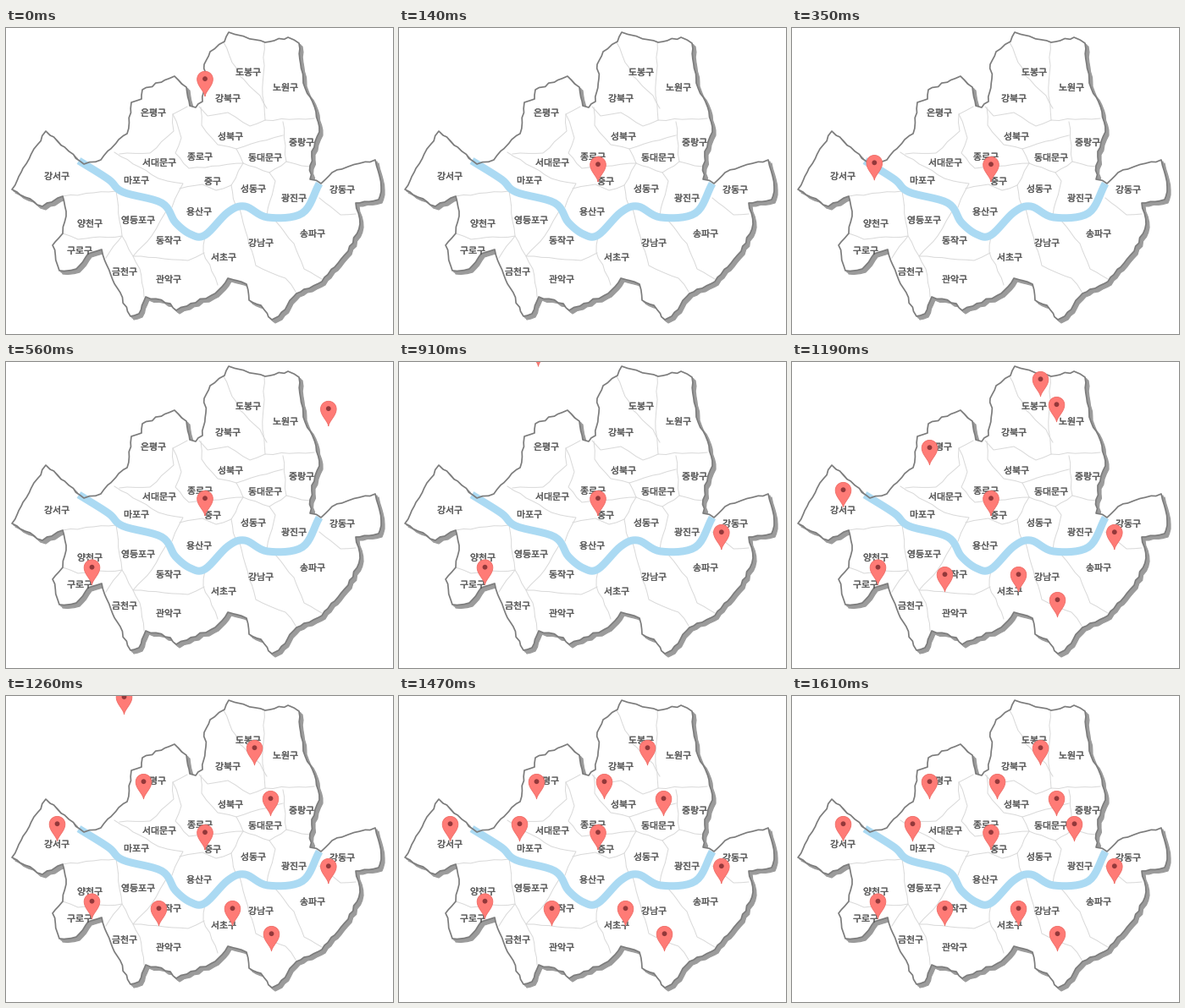
A matplotlib script that plays this animation: 457x362 px, repeating every 8000 ms.

```python
import numpy as np
import matplotlib.pyplot as plt
from matplotlib.animation import FuncAnimation
from matplotlib.patches import Circle, Polygon
from matplotlib.patheffects import withStroke

W, H, DPI = 457, 362, 100
LOOP, INTERVAL, STEP = 8000, 20, 70
PT = 72 / DPI

INK, SHADOW, BORDER = "#7c7c7c", "#9b9b9b", "#d9d9d9"
RIVER, LABEL = "#abdaf3", "#5c5c5c"
PIN, PIN_EDGE, PIN_DOT = "#ff7b76", "#f06f69", "#93383a"

# Turning points of the city limits, clockwise from the west
NORTH = [
    (7, 191), (20, 166), (33, 143), (47, 122), (92, 161), (112, 156),
    (133, 132), (143, 125), (148, 88), (160, 84), (161, 73), (199, 57),
    (213, 70), (217, 92), (224, 94), (232, 87), (236, 60), (234, 43),
    (241, 28), (258, 16), (263, 5), (306, 17), (333, 11), (346, 18),
    (351, 65), (366, 99), (370, 123), (361, 146), (359, 179), (372, 184),
]
SOUTH = [
    (385, 171), (404, 164), (436, 156), (443, 188), (440, 203), (413, 207),
    (418, 232), (404, 264), (373, 300), (343, 314), (322, 341), (314, 345),
    (301, 328), (287, 322), (284, 303), (262, 296), (247, 314), (201, 334),
    (194, 326), (165, 318), (157, 338), (147, 341), (126, 298), (113, 262),
    (97, 267), (83, 285), (63, 287), (55, 257), (67, 243), (71, 217),
    (67, 199), (43, 211),
]

RIVER_PATH = [
    (86, 157), (121, 179), (138, 194), (184, 207), (200, 230), (218, 244),
    (235, 245), (262, 218), (282, 211), (309, 224), (350, 219), (370, 184),
]

# District borders as chains between their main junctions
NORTH_CHAINS = [
    [(257, 17), (274, 55), (300, 80), (308, 95)],
    [(305, 17), (303, 80), (306, 109), (364, 107)],
    [(228, 93), (238, 104), (262, 100), (288, 116), (306, 109)],
    [(214, 93), (197, 102), (198, 122), (170, 148), (134, 149)],
    [(197, 102), (207, 130), (200, 148), (216, 166), (280, 160)],
    [(230, 94), (231, 115), (250, 138), (272, 143), (327, 127)],
    [(327, 111), (331, 158), (359, 164)],
    [(272, 143), (280, 160), (311, 171), (331, 158)],
    [(280, 160), (266, 186), (271, 209)],
    [(311, 171), (318, 181), (308, 222)],
    [(128, 147), (180, 178), (209, 184), (196, 212)],
    [(205, 190), (232, 185), (248, 192), (266, 186)],
]
SOUTH_CHAINS = [
    [(67, 199), (130, 193), (137, 246), (118, 272)],
    [(67, 243), (85, 250), (137, 246), (158, 285), (163, 318)],
    [(192, 211), (172, 246), (150, 270), (215, 275), (234, 266)],
    [(235, 247), (233, 265), (250, 304)],
    [(276, 214), (295, 281), (330, 296), (342, 312)],
    [(318, 228), (340, 255), (352, 285), (373, 297)],
    [(370, 201), (395, 221), (413, 220)],
]

LABELS = [
    ("도봉구", 286, 52), ("노원구", 330, 70), ("강북구", 262, 83),
    ("은평구", 174, 100), ("성북구", 265, 128), ("중랑구", 349, 135),
    ("종로구", 229, 152), ("동대문구", 306, 153), ("서대문구", 181, 159),
    ("마포구", 154, 180), ("중구", 244, 181), ("성동구", 292, 190),
    ("광진구", 340, 201), ("강동구", 397, 191), ("강서구", 60, 175),
    ("양천구", 99, 231), ("영등포구", 156, 227), ("용산구", 228, 217),
    ("동작구", 192, 251), ("송파구", 362, 243), ("강남구", 301, 254),
    ("서초구", 257, 271), ("구로구", 87, 263), ("금천구", 140, 288),
    ("관악구", 192, 297),
]

# Resting tip x, y, landing step, then optionally the steps it takes
# to fall from the top edge and its sideways drift per step
DROPS = [
    (235, 182, 2, 3.6), (101.5, 263.5, 6, 3.16, 4.2), (380.8, 222, 10, 3.04),
    (162.5, 122, 15, 2.09, -1), (313.5, 302, 15), (180.5, 272, 17, 2.78),
    (60.5, 172, 17), (267.5, 272, 17), (312.5, 142, 18), (293.5, 82, 18),
    (142.5, 172, 20, 2.29, 1.5), (242.5, 122, 21), (333.5, 172, 23),
]

rng = np.random.default_rng(4)


def rough(points, amount, pitch=6):
    """Split each leg into short pieces and nudge the joints at random."""
    p = np.array(points, float)
    out = []
    for a, b in zip(p, p[1:]):
        n = max(1, round(np.hypot(*(b - a)) / pitch))
        leg = a + (b - a) * np.arange(n)[:, None] / n
        leg[1:] += rng.uniform(-amount, amount, (n - 1, 2))
        out.append(leg)
    return np.vstack(out + [p[-1:]])


def smooth(points, n=8):
    """Catmull-Rom curve through the points."""
    p = np.array(points, float)
    p = np.vstack([2 * p[0] - p[1], p, 2 * p[-1] - p[-2]])
    t = np.linspace(0, 1, n, endpoint=False)[:, None]
    parts = []
    for a, b, c, d in zip(p, p[1:], p[2:], p[3:]):
        parts.append(0.5 * (2 * b + (c - a) * t + (2 * a - 5 * b + 4 * c - d) * t**2
                            + (3 * b - a - 3 * c + d) * t**3))
    return np.vstack(parts + [p[-2:-1]])


def pin_shape(r=9.3, drop=20.3):
    """Round head above a taper that ends in the tip at the origin."""
    a = np.linspace(np.pi, 2 * np.pi, 24)
    head = np.column_stack([r * np.cos(a), r * np.sin(a) - drop])
    s = np.linspace(0, 1, 14)[1:]
    side = np.column_stack([r * np.cos(s * np.pi / 2) ** 1.6, drop * (s - 1)])
    return np.vstack([head, side, side[-2::-1] * [-1, 1]])


fig = plt.figure(figsize=(W / DPI, H / DPI), dpi=DPI, facecolor="white")
ax = fig.add_axes([0, 0, 1, 1])
ax.set(xlim=(0, W), ylim=(H, 0))
ax.axis("off")


def draw_map():
    city = rough(NORTH + SOUTH + NORTH[:1], 1.2)
    for offset in (2, 4):
        ax.add_patch(Polygon(city + offset, fc=SHADOW, ec=SHADOW, lw=1.2 * PT,
                             joinstyle="round", zorder=1))
    ax.add_patch(Polygon(city, fc="white", ec="none", zorder=2))
    for chain in NORTH_CHAINS + SOUTH_CHAINS:
        ax.plot(*rough(chain, 1, 9).T, color=BORDER, lw=PT, zorder=3)
    ax.plot(*smooth(RIVER_PATH).T, color=RIVER, lw=9 * PT, zorder=4,
            solid_capstyle="butt", solid_joinstyle="round")
    ax.add_patch(Polygon(city, fc="none", ec=INK, lw=1.7 * PT,
                         joinstyle="round", zorder=5))
    bolder = [withStroke(linewidth=0.35 * PT, foreground=LABEL)]
    for name, x, y in LABELS:
        ax.text(x, y + 1.1, name, family="Noto Sans CJK JP", size=10.9 * PT,
                color=LABEL, ha="center", va="center", zorder=6,
                path_effects=bolder)


def make_pin(z):
    body = Polygon(SHAPE, fc=PIN, ec=PIN_EDGE, lw=0.9 * PT, zorder=z)
    dot = Circle((0, 0), 2.9, fc=PIN_DOT, ec="none", zorder=z + 0.1)
    return ax.add_patch(body), ax.add_patch(dot)


def tip_at(step, x, y, land, fall=2, drift=0):
    left = max(0, land - step)
    return np.array([x - drift * left, y * (1 - left / fall)])


SHAPE = pin_shape()
draw_map()
pins = [make_pin(10 + i) for i in range(len(DROPS))]


def update(i):
    step = (i * INTERVAL + INTERVAL // 2) // STEP
    for (body, dot), drop in zip(pins, DROPS):
        tip = tip_at(step, *drop)
        body.set_xy(SHAPE + tip)
        dot.center = tip - (0, 20.8)
        for part in (body, dot):
            part.set_visible(tip[1] > 0)
    return [part for pin in pins for part in pin]


anim = FuncAnimation(fig, update, frames=LOOP // INTERVAL, interval=INTERVAL,
                     repeat=True, repeat_delay=0, blit=False)
plt.show()
```
